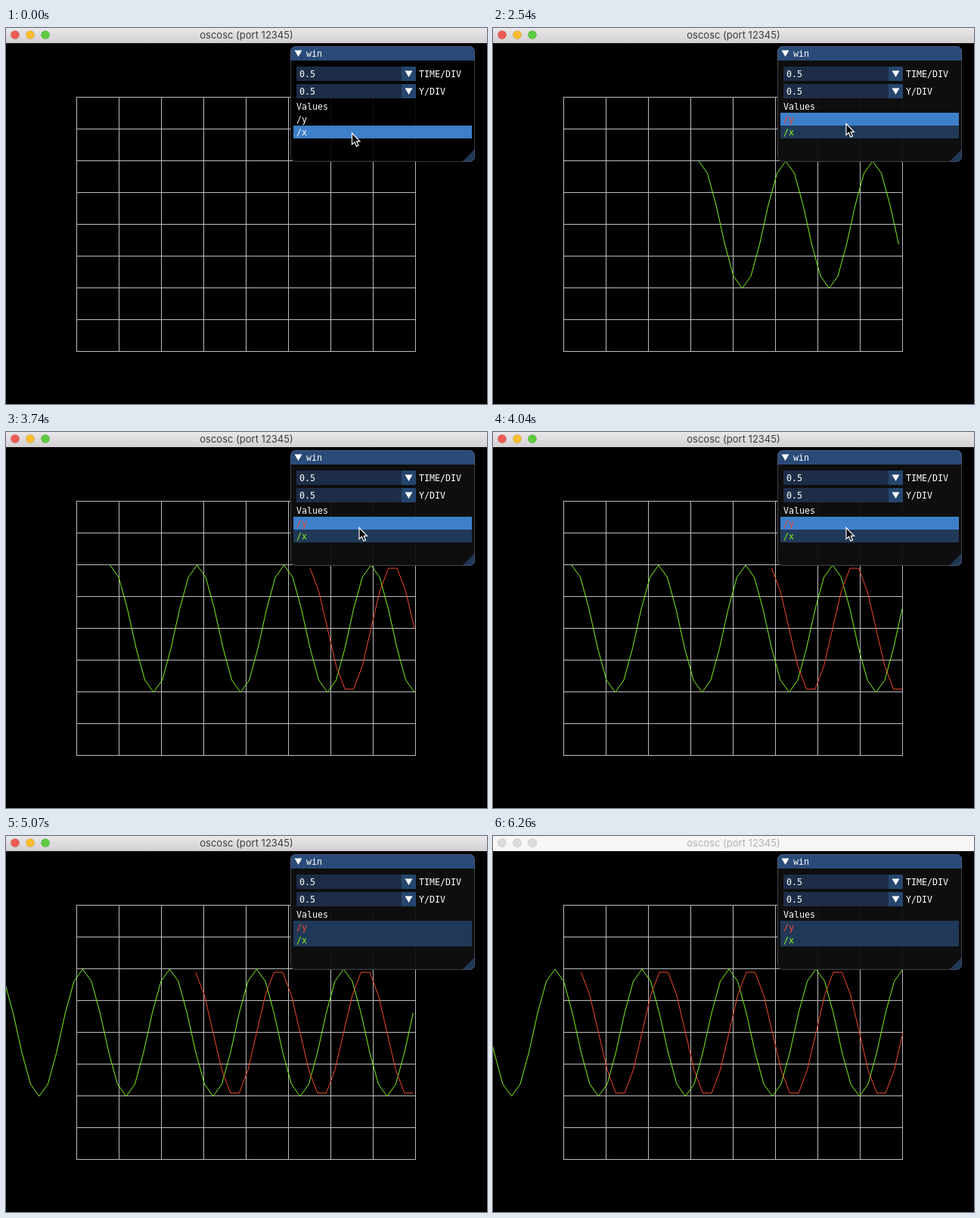
Recreate the animation shown at these times as an HTML page with a canvas. Size 636 by 497 pixels, loop 6360 ms.

```html
<!DOCTYPE html>
<html lang="en">
<head>
<meta charset="utf-8">
<title>oscosc</title>
<style>
  html, body { margin: 0; width: 100%; height: 100%; overflow: hidden; background: #000; }
  canvas { display: block; }
</style>
</head>
<body>
<canvas id="stage" width="636" height="497"></canvas>
<script>
const ctx = document.getElementById('stage').getContext('2d');
const LOOP = 6360, STEP = 148.9;
const SCROLL = 16.8, SAMPLE = 11.5, RIGHT = 541;
const GREEN = '#80f41c', RED = '#f4482c';

// cursor tip: [step, x, y]
const cursorPath = [[0, 457, 138.5], [4, 468.5, 134.5], [11, 468.5, 134.5], [14, 466.5, 126],
                    [27, 466.5, 126], [30, 541.5, 317], [33, 597, 500]];

function rect(color, x, y, w, h) {
  ctx.fillStyle = color;
  ctx.fillRect(x, y, w, h);
}

function polygon(color, points) {
  ctx.fillStyle = color;
  ctx.beginPath();
  points.forEach(([x, y]) => ctx.lineTo(x, y));
  ctx.closePath();
  ctx.fill();
}

function label(text, x, y, color = '#fff') {
  ctx.font = '11.63px "DejaVu Sans Mono", monospace';
  ctx.textAlign = 'left';
  ctx.fillStyle = color;
  ctx.fillText(text, x, y);
}

function downArrow(x, y) {
  polygon('#fff', [[x - 5, y - 4], [x + 5, y - 4], [x, y + 4.5]]);
}

function drawTitleBar(active) {
  const shade = ctx.createLinearGradient(0, 0, 0, 20);
  shade.addColorStop(0, active ? '#e9e7e9' : '#f6f6f6');
  shade.addColorStop(1, active ? '#d2d0d2' : '#f6f6f6');
  rect(shade, 0, 0, 636, 20);
  ['#f05b53', '#fbbd2e', '#5dcd40'].forEach((color, i) => {
    ctx.beginPath();
    ctx.arc(12 + 20 * i, 9, 5.6, 0, 7);
    ctx.fillStyle = active ? color : '#dcdcdc';
    ctx.fill();
    ctx.lineWidth = 0.8;
    ctx.strokeStyle = active ? 'rgba(0,0,0,.15)' : '#cbcbcb';
    ctx.stroke();
  });
  ctx.font = '13px Inter, sans-serif';
  ctx.textAlign = 'center';
  ctx.fillStyle = active ? '#3e3e3e' : '#b2b2b2';
  ctx.fillText('oscosc (port 12345)', 318, 14);
}

function drawGrid() {
  ctx.beginPath();
  for (let i = 0; i <= 8; i++) {
    const x = 93.5 + 56 * i, y = 91.5 + 42 * i;
    ctx.moveTo(x, 91); ctx.lineTo(x, 428);
    ctx.moveTo(93, y); ctx.lineTo(542, y);
  }
  ctx.lineWidth = 1;
  ctx.strokeStyle = '#bcbcbc';
  ctx.stroke();
}

function drawWave(color, wave, first, last, startX) {
  ctx.beginPath();
  for (let k = first; k <= last; k++) {
    ctx.lineTo(startX + SAMPLE * k, 260 - 84 * wave(k * Math.PI / 5));
  }
  ctx.lineWidth = 1;
  ctx.strokeStyle = color;
  ctx.stroke();
}

function drawCombo(y, name) {
  rect('#1d2d47', 384, y, 139, 19);
  rect('#25466e', 523, y, 19, 19);
  downArrow(532.5, y + 9.5);
  label('0.5', 388, y + 14);
  label(name, 546, y + 14);
}

function drawRow(y, name, color, selected, hovered, pressed) {
  const fill = pressed ? '#4296fa' : hovered ? '#3e7fca' : selected && '#213958';
  if (fill) rect(fill, 380, y, 236, 17);
  label(name, 384, y + 13, selected ? color : '#fff');
}

function drawPanel(n, cursor) {
  const over = y => cursor[1] >= y && cursor[1] < y + 17;
  ctx.save();
  ctx.beginPath();
  ctx.roundRect(376, 24, 244, 153, 7);
  ctx.clip();
  rect(n < 11 ? 'rgba(0,0,0,.92)' : 'rgba(15,15,15,.94)', 376, 24, 244, 153);
  rect('#2a4a78', 376, 24, 244, 19);
  polygon('#203754', [[620, 160], [620, 177], [603, 177]]);
  ctx.restore();
  ctx.beginPath();
  ctx.roundRect(376.5, 24.5, 243, 152, 7);
  ctx.lineWidth = 1;
  ctx.strokeStyle = 'rgba(110,110,128,.5)';
  ctx.stroke();

  downArrow(386.5, 33.5);
  label('win', 397, 38);
  drawCombo(51, 'TIME/DIV');
  drawCombo(74, 'Y/DIV');
  label('Values', 384, 108);
  drawRow(112, '/y', RED, n >= 17, over(112), n === 16);
  drawRow(129, '/x', GREEN, n >= 1, over(129), false);
}

function cursorAt(n) {
  const i = cursorPath.findIndex(p => p[0] > n);
  if (i < 0) return [597, 500];
  const [n0, x0, y0] = cursorPath[i - 1], [n1, x1, y1] = cursorPath[i];
  const u = (n - n0) / (n1 - n0);
  return [x0 + (x1 - x0) * u, y0 + (y1 - y0) * u];
}

function drawCursor([x, y]) {
  ctx.save();
  ctx.translate(x, y);
  const arrow = [[0.5, 0.5], [0.5, 15.5], [4, 12.3], [6.4, 18], [9, 16.9], [6.7, 11.4], [11, 11.4]];
  polygon('#000', arrow);
  ctx.lineWidth = 1.2;
  ctx.strokeStyle = '#fff';
  ctx.stroke();
  ctx.restore();
}

function draw() {
  const n = Math.floor(performance.now() % LOOP / STEP);
  const elapsed = 269 + SCROLL * (n - 17);
  const startX = Math.min(324, RIGHT - elapsed);
  const last = Math.floor(elapsed / SAMPLE + 0.1);
  const cursor = cursorAt(n);

  rect('#000', 0, 0, 636, 497);
  drawGrid();
  drawWave(GREEN, Math.cos, 0, last, startX);
  drawWave(RED, Math.sin, 23, last, startX);
  drawPanel(n, cursor);
  drawTitleBar(n < 40);
  drawCursor(cursor);
  requestAnimationFrame(draw);
}
draw();
</script>
</body>
</html>
```
